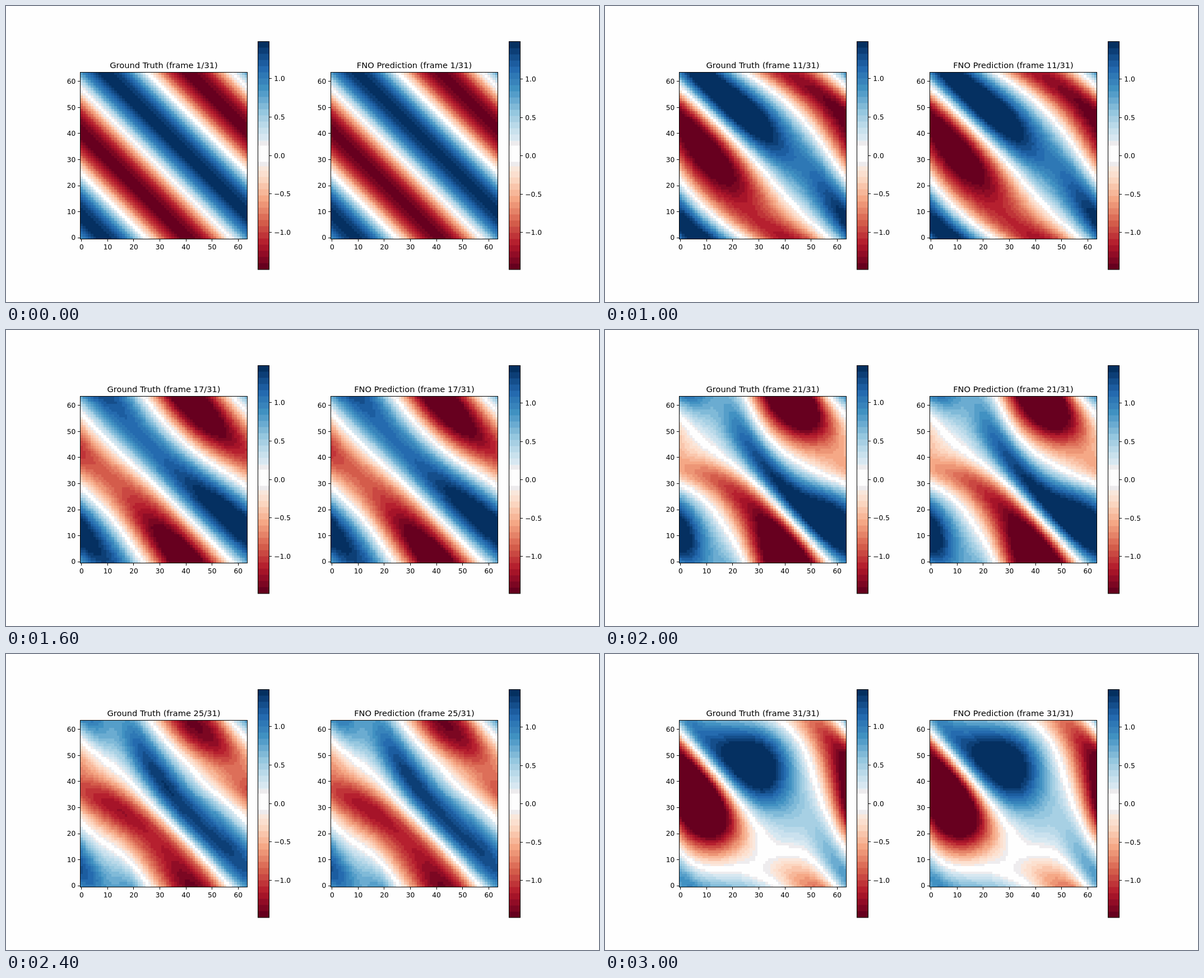
Write an HTML page with a canvas that moves like this. It is 1058 px wide and 529 px high and loops after 3100 ms.

```html
<!DOCTYPE html>
<html lang="en">
<head>
<meta charset="utf-8">
<title>Field comparison</title>
<style>
html, body { margin: 0; width: 100%; height: 100%; overflow: hidden; background: #fefefe; }
canvas { display: block; }
</style>
</head>
<body>
<canvas id="stage" width="1058" height="529"></canvas>
<script>
const ctx = document.getElementById('stage').getContext('2d');
const N = 64, FRAMES = 31, FRAME_MS = 100;
const SIZE = 298, TOP = 118.5, CELL = SIZE / N;
const BAR_TOP = 63.5, BAR_H = 407.5;
const { sin, cos, sqrt, PI } = Math;
const rad = deg => deg * PI / 180;

// Diverging red-white-blue ramp, shown in narrow bands
const ramp = ['67001f', 'b2182b', 'd6604d', 'f4a582', 'fddbc7', 'f7f7f7',
  'd1e5f0', '92c5de', '4393c3', '2166ac', '053061']
  .map(h => [0, 2, 4].map(i => parseInt(h.slice(i, i + 2), 16)));
const BANDS = 37;

function colour(v, max) {
  if (v > -0.08 && v < 0.13) return [254, 254, 254];
  if (v > -0.14 && v < 0.19) return [238, 236, 238];
  const u = Math.min(0.9999, Math.max(0, (v / max + 1) / 2));
  const p = Math.floor(u * BANDS) / (BANDS - 1) * 10;
  const i = Math.min(9, Math.floor(p));
  return ramp[i].map((c, k) => Math.round(c + (ramp[i + 1][k] - c) * (p - i)));
}

// Vorticity as Fourier waves: three long waves are steered, and the
// finer ones follow from advection and viscosity on a periodic square.
const K = 5, SIDE = 2 * K + 1, STEPS = 10, VISCOSITY = 0.0395;
const at = (kx, ky) => (kx + K) * SIDE + ky + K;
const waves = [];
for (let x = -K; x <= K; x++)
  for (let y = -K; y <= K; y++) if (x || y) waves.push({ x, y, sq: x * x + y * y, i: at(x, y) });

function setWave(w, kx, ky, amp, phase) {
  const re = amp / 2 * cos(phase), im = -amp / 2 * sin(phase);
  w.re[at(kx, ky)] = w.re[at(-kx, -ky)] = re;
  w.im[at(kx, ky)] = im;
  w.im[at(-kx, -ky)] = -im;
}

// Diagonal stripes slowly fade while the two cross waves swing and grow
function steer(w, t) {
  const swing = sin(PI * (t - 13) / 11.3);
  setWave(w, 1, 1, 1.46 - 0.46 * (t / 30) ** 2, rad(50));
  setWave(w, 1, 0, 0.024 * t * swing, rad(48 - 1.3 * t));
  setWave(w, 0, 1, -0.08 * sqrt(t) * swing, rad(-45));
}

function advance(w, dt) {
  const dRe = new Float64Array(SIDE * SIDE), dIm = new Float64Array(SIDE * SIDE);
  for (const p of waves)
    for (const q of waves) {
      const x = p.x + q.x, y = p.y + q.y;
      if (Math.abs(x) > K || Math.abs(y) > K) continue;
      const c = (p.y * q.x - p.x * q.y) / p.sq, k = at(x, y);
      dRe[k] += c * (w.re[p.i] * w.re[q.i] - w.im[p.i] * w.im[q.i]);
      dIm[k] += c * (w.re[p.i] * w.im[q.i] + w.im[p.i] * w.re[q.i]);
    }
  for (const { i, sq } of waves) {
    const decay = Math.exp(-VISCOSITY * sq * dt);
    w.re[i] = (w.re[i] + dt * dRe[i]) * decay;
    w.im[i] = (w.im[i] + dt * dIm[i]) * decay;
  }
}

function simulate() {
  const w = { re: new Float64Array(SIDE * SIDE), im: new Float64Array(SIDE * SIDE) };
  const states = [];
  for (let n = 0; n <= (FRAMES - 1) * STEPS; n++) {
    steer(w, n / STEPS);
    if (n % STEPS === 0) states.push({ re: w.re.slice(), im: w.im.slice() });
    advance(w, 1 / STEPS);
  }
  return states;
}
const states = simulate();

function fieldOf(w) {
  const out = new Float32Array(N * N), unit = 2 * PI / N;
  for (let x = 0; x < N; x++)
    for (let ky = -K; ky <= K; ky++) {
      let re = 0, im = 0;
      for (let kx = -K; kx <= K; kx++) {
        const i = at(kx, ky), c = cos(kx * x * unit), s = sin(kx * x * unit);
        re += w.re[i] * c - w.im[i] * s;
        im += w.re[i] * s + w.im[i] * c;
      }
      for (let y = 0; y < N; y++)
        out[y * N + x] += re * cos(ky * y * unit) - im * sin(ky * y * unit);
    }
  return out;
}

const tile = document.createElement('canvas');
tile.width = tile.height = N;
const tileCtx = tile.getContext('2d');
const pixels = tileCtx.createImageData(N, N);

function drawField(field, left, max) {
  for (let y = 0; y < N; y++)
    for (let x = 0; x < N; x++)
      pixels.data.set([...colour(field[y * N + x], max), 255], ((N - 1 - y) * N + x) * 4);
  tileCtx.putImageData(pixels, 0, 0);
  ctx.imageSmoothingEnabled = false;
  ctx.drawImage(tile, left, TOP, SIZE, SIZE);
}

function text(str, x, y, align, size) {
  ctx.font = size + 'px "DejaVu Sans", sans-serif';
  ctx.textAlign = align;
  ctx.fillText(str, x, y);
}

function line(x1, y1, x2, y2) {
  ctx.beginPath();
  ctx.moveTo(x1, y1);
  ctx.lineTo(x2, y2);
  ctx.stroke();
}

const snap = v => Math.floor(v) + 0.5;

function drawAxes(left) {
  const bottom = TOP + SIZE;
  ctx.strokeRect(left, TOP, SIZE, SIZE);
  for (let n = 0; n <= 60; n += 10) {
    const d = (n + 0.5) * CELL;
    line(snap(left + d), bottom, snap(left + d), bottom + 4.5);
    line(left - 4.5, snap(bottom - d), left, snap(bottom - d));
    text(n, left + d, 435, 'center', 12.2);
    text(n, left - 8.3, bottom - d + 4.3, 'right', 12.2);
  }
}

function drawBar(left, zero, unit, max) {
  for (let y = 0; y < BAR_H; y++) {
    ctx.fillStyle = `rgb(${colour((zero - BAR_TOP - y - 0.5) / unit, max)})`;
    ctx.fillRect(left, BAR_TOP + y, 20, Math.min(1.5, BAR_H - y));
  }
  ctx.fillStyle = '#000';
  ctx.strokeRect(left, BAR_TOP, 20, BAR_H);
  for (let v = -1; v <= 1; v += 0.5) {
    const y = zero - v * unit;
    line(left + 20, snap(y), left + 24.5, snap(y));
    text(v.toFixed(1).replace('-', '\u2212'), left + 28.8, y + 4.4, 'left', 12.2);
  }
}

const panels = [
  { name: 'Ground Truth', left: 132.5, bar: 449.5, zero: 267.2, unit: 137.5, max: 1.48 },
  { name: 'FNO Prediction', left: 579.5, bar: 897.5, zero: 267.7, unit: 136.8, max: 1.488 }
];

function draw(frame) {
  ctx.fillStyle = '#fefefe';
  ctx.fillRect(0, 0, 1058, 529);
  ctx.strokeStyle = '#000';
  ctx.lineWidth = 1;
  const field = fieldOf(states[frame]);
  for (const p of panels) {
    drawField(field, p.left, p.max);
    drawBar(p.bar, p.zero, p.unit, p.max);
    drawAxes(p.left);
    text(`${p.name} (frame ${frame + 1}/${FRAMES})`, p.left + SIZE / 2, 110.8, 'center', 14.65);
  }
}

let shown = -1;
function tick() {
  const frame = Math.floor(performance.now() / FRAME_MS) % FRAMES;
  if (frame !== shown) draw(shown = frame);
  requestAnimationFrame(tick);
}
tick();
</script>
</body>
</html>
```
